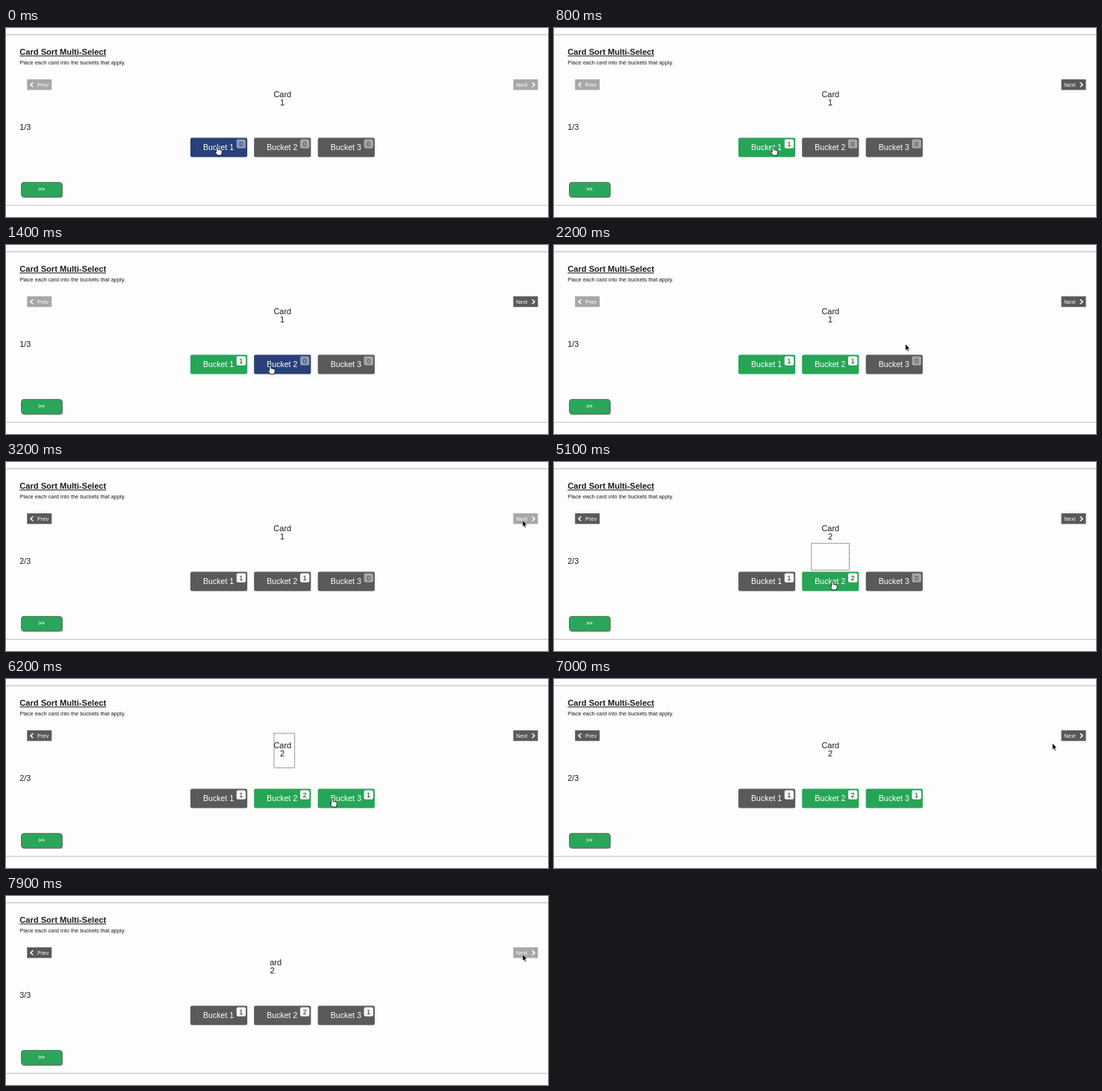
An HTML page that plays this animation: 726x254 px, repeating every 8000 ms.

```html
<!DOCTYPE html>
<html lang="en">
<head>
<meta charset="utf-8">
<title>Card sort</title>
<style>
html, body { margin: 0; width: 100%; height: 100%; overflow: hidden; background: #fdfdfd; }
svg { display: block; font-family: "Liberation Sans", Arial, Helvetica, sans-serif; }
.mid { text-anchor: middle; }
.white { fill: #fff; }
.chevron { fill: none; stroke: #fff; stroke-width: 1.5; }
</style>
</head>
<body>
<svg width="726" height="254" viewBox="0 0 726 254" fill="#1c1c1c">
  <clipPath id="slot"><rect x="353.5" y="70" width="33.5" height="48"/></clipPath>
  <path d="M0 9H726M0 238.3H726" stroke="#ccc" stroke-width="1.3"/>
  <text x="18.3" y="36" font-size="11.1" font-weight="bold">Card Sort Multi-Select</text>
  <path d="M18.3 37.6H134" stroke="#1c1c1c"/>
  <text x="18.3" y="48.5" font-size="7.35">Place each card into the buckets that apply.</text>

  <rect id="prev" x="28.2" y="69" width="33" height="14.3"/>
  <path class="chevron" d="M36.2 73.2L33 76.2L36.2 79.2"/>
  <text class="white" x="42" y="78.8" font-size="7.35">Prev</text>
  <rect id="next" x="679.5" y="69" width="33" height="14.3"/>
  <path class="chevron" d="M704.8 73.2L708 76.2L704.8 79.2"/>
  <text class="white" x="683.3" y="78.8" font-size="7.35">Next</text>

  <g clip-path="url(#slot)">
    <g id="card" class="mid" font-size="11">
      <text x="370.3" y="93">Card</text>
      <text id="cardNo" x="370" y="104"></text>
    </g>
  </g>
  <text id="page" x="18.3" y="136.8" font-size="10.7"></text>
  <g id="buckets"></g>

  <rect x="21.2" y="208.2" width="55" height="20" rx="3.5" fill="#999"/>
  <rect x="20.5" y="207.4" width="54.5" height="19.6" rx="3.5" fill="#2aa65a" stroke="#56705f"/>
  <text class="mid white" x="47.4" y="219.4" font-size="7.2" font-weight="bold">&gt;&gt;</text>

  <rect id="ghost" fill="none" stroke="#222" stroke-dasharray="1.1 1.3"/>
  <path id="hand" fill="#fff" stroke="#000" stroke-width=".8" stroke-linejoin="round"
    d="M-1.2 6.5V1Q-.9 0 0 0T1.2 1V4L3.5 4.2L5.6 5Q6.5 5.4 6.3 7.5L5.4 11.5H.2L-2.8 7.6Q-2.6 6-1.2 7Z"/>
  <path id="arrow" fill="#000" stroke="#fff" stroke-width=".5"
    d="M0 0V8.6L1.9 6.9L3.2 9.8L4.6 9.2L3.3 6.4L5.9 6.2Z"/>
</svg>
<script>
const LOOP = 8000, STEP = 100, MOVE = 500, SLIDE = 29;
const DARK = '#5a5a5a', PALE = '#a7a7a7', GREEN = '#27a557', BLUE = '#2a4079';
const CARD = [356.5, 70, 383.5, 118];
const BUCKETS = [247, 332.2, 417.7].map(x => [x, 147.5, x + 76.2, 173.5]);
const NEXT = [679.5, 69, 712.5, 83.3];
const picks = [[50, 0], [1650, 1], [4850, 1], [6142, 2]];   // time, bucket
const turns = [3190, 7665];                                // clicks on Next
const mouse = [                                            // time, x, y
  [0, 283, 159.5], [600, 283, 159.5], [1400, 354, 162], [1900, 354, 162],
  [2650, 692, 78.5], [3500, 692, 78.5], [4250, 376, 154], [4400, 376, 154],
  [4800, 373, 160.5], [5250, 373, 160.5], [5800, 437, 160.5], [6400, 437, 160.5],
  [7150, 692, 78.5], [LOOP, 692, 78.5]
];

const $ = id => document.getElementById(id);
const set = (el, attrs) => { for (const k in attrs) el.setAttribute(k, attrs[k]); };
const mix = (a, b, f) => a + (b - a) * f;
const swing = p => .5 - Math.cos(Math.PI * Math.min(1, Math.max(0, p))) / 2;
const inside = ([l, t, r, b], x, y) => x >= l && x <= r && y >= t && y <= b;

$('buckets').innerHTML = BUCKETS.map(([x, y], i) => `<g class="mid">
  <rect x="${x}" y="${y}" width="76.2" height="26" rx="2.2"/>
  <text class="white" x="${x + 37.6}" y="163.8" font-size="10.6">Bucket ${i + 1}</text>
  <rect class="white" x="${x + 61.8}" y="149.6" width="12.4" height="12.2" rx="2"/>
  <text x="${x + 68}" y="158.6" font-size="8.6"></text></g>`).join('');

function pointer(t) {
  const i = mouse.findIndex(m => m[0] > t);
  const [t0, x0, y0] = mouse[i - 1], [t1, x1, y1] = mouse[i];
  const f = swing((t - t0) / (t1 - t0));
  return [mix(x0, x1, f), mix(y0, y1, f)];
}

function draw(t) {
  const done = turns.filter(s => s <= t), turned = done.length ? done[done.length - 1] : -LOOP;
  const made = picks.filter(p => p[0] <= t), current = made.filter(p => p[0] > turned);
  const [x, y] = pointer(t);
  const ready = current.length > 0;

  $('page').textContent = `${done.length + 1}/3`;
  set($('prev'), { fill: done.length ? DARK : PALE });
  set($('next'), { fill: ready ? DARK : PALE });

  // The old card leaves to the left, then the new one enters from the right.
  const since = t - turned, leaving = since < MOVE;
  const shift = leaving ? -SLIDE * swing(since / MOVE) : SLIDE * (1 - swing(since / MOVE - 1));
  $('cardNo').textContent = done.length + (leaving ? 0 : 1);
  set($('card'), { transform: `translate(${shift})` });

  let clickable = ready && inside(NEXT, x, y);
  BUCKETS.forEach((box, i) => {
    const [body, , badge, digit] = $('buckets').children[i].children;
    const count = made.filter(p => p[1] === i).length;
    const hover = inside(box, x, y);
    clickable ||= hover;
    set(body, { fill: current.some(p => p[1] === i) ? GREEN : hover ? BLUE : DARK });
    set(badge, { opacity: count ? .95 : .45 });
    set(digit, { fill: count ? '#1c1c1c' : '#3c3c3c' });
    digit.textContent = count;
  });

  // A dotted outline flies from the card to the chosen bucket.
  const last = current[current.length - 1], flying = last && t - last[0] < MOVE;
  $('ghost').style.display = flying ? '' : 'none';
  if (flying) {
    const f = swing((t - last[0]) / MOVE);
    const [l, top, r, b] = CARD.map((v, k) => mix(v, BUCKETS[last[1]][k], f));
    set($('ghost'), { x: l + .5, y: top + .5, width: r - l - 1, height: b - top - 1 });
  }

  for (const id of ['hand', 'arrow']) {
    set($(id), { transform: `translate(${x} ${y})` });
    $(id).style.display = (id === 'hand') === clickable ? '' : 'none';
  }
}

const start = performance.now();
function tick() {
  const t = (performance.now() - start) % LOOP;
  draw(Math.floor(t / STEP) * STEP);
  requestAnimationFrame(tick);
}
tick();
</script>
</body>
</html>
```
